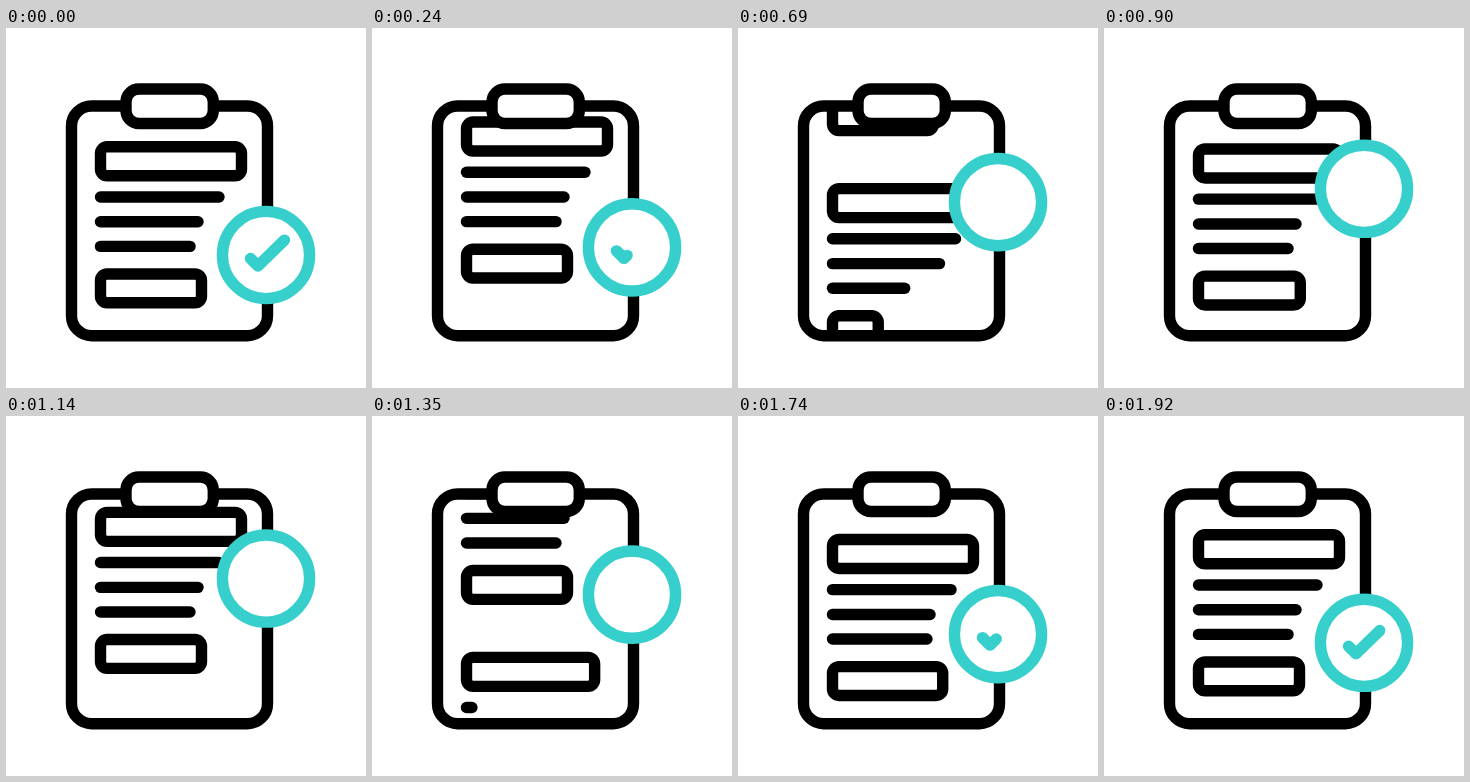
Recreate the animation shown at these times as an HTML page with a canvas. Size 360x360 px, loop 1950 ms.

```html
<!DOCTYPE html>
<html>
<head>
<meta charset="utf-8">
<title>Checklist</title>
<style>
html, body { margin: 0; width: 100%; height: 100%; overflow: hidden; background: #fff; }
canvas { display: block; width: 360px; height: 360px; }
</style>
</head>
<body>
<canvas id="stage" width="360" height="360"></canvas>
<script>
const c = document.getElementById('stage').getContext('2d');
const LOOP = 1950, PAGE = 214, LEFT = 94.5;
const SECOND_PASS = 926, RISE = 245, SETTLE = 88;

// y, full width, height (0 = plain line), time it starts to grow
const ITEMS = [
  { y: 118.8, w: 141, h: 29, start: 245 },
  { y: 169, w: 118.5, h: 0, start: 395 },
  { y: 193.8, w: 97.5, h: 0, start: 453 },
  { y: 218.4, w: 89.5, h: 0, start: 529 },
  { y: 246, w: 101, h: 28.8, start: 583 }
];

const progress = (t, a, b) => Math.min(1, Math.max(0, (t - a) / (b - a)));
const ease = (t, a, b) => {
  const p = progress(t, a, b);
  return p * p * (3 - 2 * p);
};
const sineEase = (t, a, b) => (1 - Math.cos(Math.PI * progress(t, a, b))) / 2;

// grows to 110 % and settles back
const growth = t => 1.1 * ease(t, 0, RISE) - 0.1 * ease(t, RISE, RISE + SETTLE);

function box(x, y, w, h, r, fill) {
  c.beginPath();
  c.roundRect(x, y, w, h, r);
  if (fill) c.fill();
  c.stroke();
}

function polyline(...points) {
  c.beginPath();
  points.forEach(([x, y]) => c.lineTo(x, y));
  c.stroke();
}

function drawPage(offset, size) {
  for (const item of ITEMS) {
    const g = size(item), y = item.y + offset, w = item.w * g;
    if (g <= 0) continue;
    if (item.h) box(LEFT, y, w, item.h, Math.min(6.5, w / 2));
    else polyline([LEFT, y], [LEFT + w, y]);
  }
}

function drawBadge(t) {
  const y = 227 - 67 * (ease(t, 50, 960) - ease(t, 1033, 1950));
  c.strokeStyle = '#36cfcb';
  c.lineWidth = 11.4;
  c.beginPath();
  c.arc(260, y, 43.6, 0, 2 * Math.PI);
  c.fill();
  c.stroke();

  const shown = 1 - progress(t, 0, 350) + progress(t, 1600, LOOP);
  if (shown <= 0) return;
  const split = 0.22;
  const a = Math.min(1, shown / split), b = Math.max(0, (shown - split) / (1 - split));
  const points = [[244.5, y + 3.5], [244.5 + 7.5 * a, y + 3.5 + 7.5 * a]];
  if (b) points.push([252 + 26.5 * b, y + 11 - 26 * b]);
  polyline(...points);
}

function draw(t) {
  c.fillStyle = '#fff';
  c.fillRect(0, 0, 360, 360);
  c.strokeStyle = '#000';
  c.lineCap = c.lineJoin = 'round';
  c.lineWidth = 11.4;

  const second = t >= 960;
  const scroll = PAGE * (second ? sineEase(t, 960, 1822) : sineEase(t, 37, 960));
  const local = second ? t - SECOND_PASS : t;
  c.save();
  c.beginPath();
  c.rect(65, 78, 197, 229.5);
  c.clip();
  drawPage(-scroll, () => 1);
  drawPage(PAGE - scroll, item => growth(local - item.start));
  c.restore();

  box(65.5, 78, 196, 229.7, 20);
  box(120, 61, 87.3, 34.5, 13, true);
  drawBadge(t);
}

function tick() {
  draw(performance.now() % LOOP);
  requestAnimationFrame(tick);
}
tick();
</script>
</body>
</html>
```
